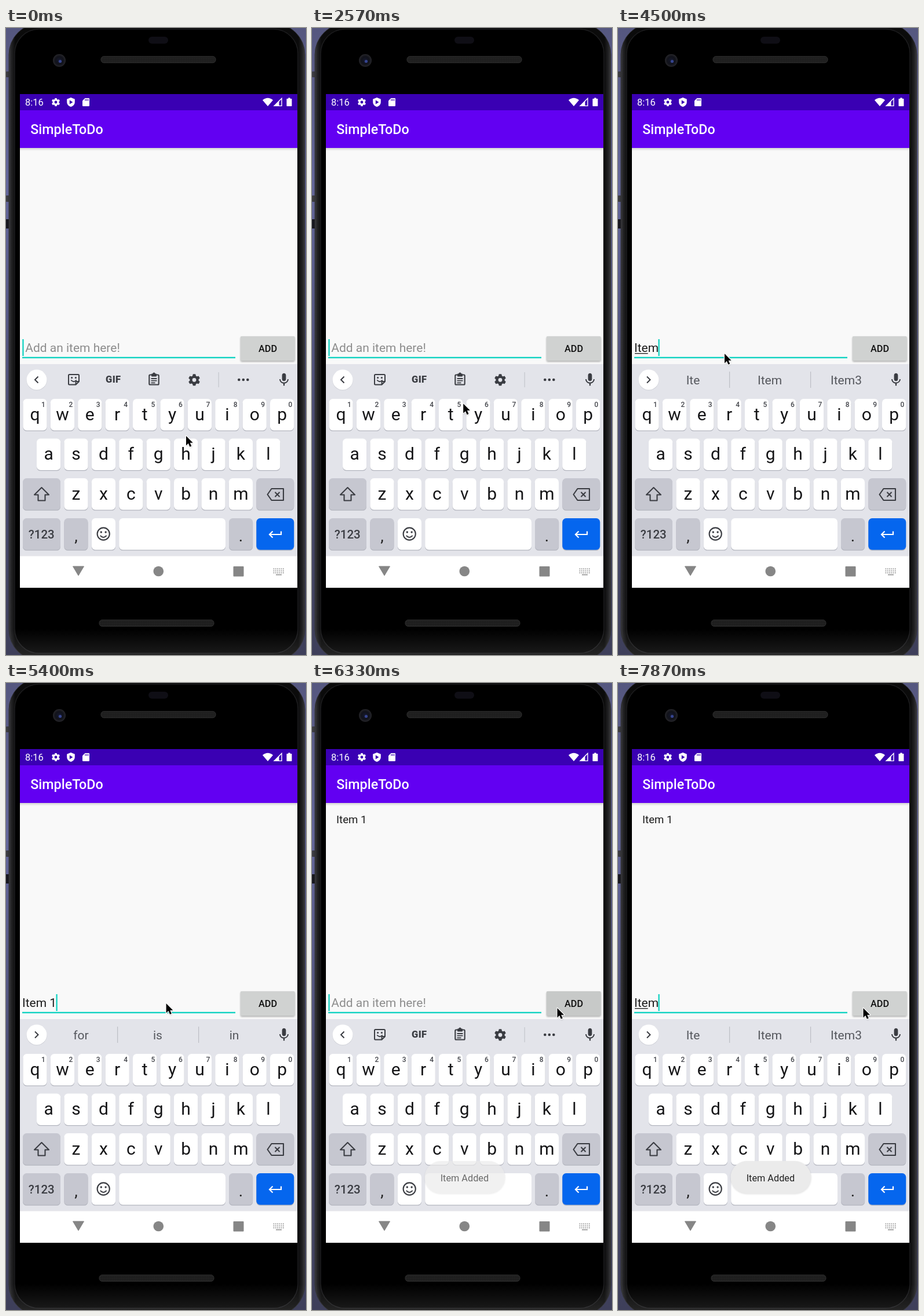
These frames come from a looping animation (518x1082 px, 8 s). An HTML page:

```html
<!DOCTYPE html>
<html lang="en">
<head>
<meta charset="utf-8">
<title>To-do list</title>
<style>
html, body { margin: 0; width: 100%; height: 100%; overflow: hidden; background: #23233a; }
svg { display: block; width: 518px; height: 1082px; }
text { font-family: Roboto, "Noto Sans", sans-serif; white-space: pre; }
</style>
</head>
<body>
<svg id="stage" viewBox="0 0 518 1082">
  <defs>
    <linearGradient id="wall" x2="0" y2="1">
      <stop offset="0" stop-color="#55577f"/><stop offset=".25" stop-color="#63669a"/>
      <stop offset=".6" stop-color="#4c4e74"/><stop offset="1" stop-color="#3e3f5a"/>
    </linearGradient>
    <linearGradient id="rim">
      <stop offset="0" stop-color="#3c3c3f"/><stop offset=".008" stop-color="#232325"/>
      <stop offset=".022" stop-color="#0b0b0b"/><stop offset=".978" stop-color="#0b0b0b"/>
      <stop offset=".992" stop-color="#232325"/><stop offset="1" stop-color="#3c3c3f"/>
    </linearGradient>
    <linearGradient id="sheen" x2="0" y2="1">
      <stop offset=".95" stop-color="#fff" stop-opacity="0"/><stop offset="1" stop-color="#fff" stop-opacity=".13"/>
    </linearGradient>
    <linearGradient id="drop" x2="0" y2="1">
      <stop offset="0" stop-color="#000" stop-opacity=".16"/><stop offset="1" stop-color="#000" stop-opacity="0"/>
    </linearGradient>
    <radialGradient id="lens">
      <stop offset="0" stop-color="#161a30"/><stop offset=".6" stop-color="#11121a"/>
      <stop offset="1" stop-color="#26262a"/>
    </radialGradient>
    <pattern id="mesh" width="3" height="3" patternUnits="userSpaceOnUse">
      <rect width="3" height="3" fill="#1c1c1c"/><circle cx="1.5" cy="1.5" r=".8" fill="#2c2c2c"/>
    </pattern>
    <filter id="soft" x="-20%" y="-20%" width="140%" height="150%"><feGaussianBlur stdDeviation="1.5"/></filter>
  </defs>
</svg>
<script>
const LOOP = 8000;
const stage = document.getElementById('stage');
const DARK = '#3a3c42', TEAL = '#12d3c2', KEY = '#fff', MOD = '#c6c7d0';

function add(tag, attrs, parent = stage) {
  const el = document.createElementNS('http://www.w3.org/2000/svg', tag);
  for (const k in attrs) el.setAttribute(k, attrs[k]);
  parent.appendChild(el);
  return el;
}
const group = (parent, attrs = {}) => add('g', attrs, parent);
const rect = (x, y, width, height, fill, rx = 0, parent, more) =>
  add('rect', { x, y, width, height, fill, rx, ...more }, parent);
const disc = (cx, cy, r, fill, parent, more) => add('circle', { cx, cy, r, fill, ...more }, parent);
const shape = (d, fill, parent, more) => add('path', { d, fill, ...more }, parent);
const stroke = (d, color, width, parent, more) =>
  shape(d, 'none', parent, { stroke: color, 'stroke-width': width, ...more });
function label(str, x, y, size, fill, parent, more) {
  const el = add('text', { x, y, 'font-size': size, fill, ...more }, parent);
  el.textContent = str;
  return el;
}
const MID = { 'text-anchor': 'middle' };
const BOLD = { 'font-weight': 500 };
const show = (el, on) => el.setAttribute('visibility', on ? 'inherit' : 'hidden');
// 24-unit icon box centred on x, y
const icon = (x, y, size, parent) =>
  group(parent, { transform: `translate(${x - size / 2} ${y - size / 2}) scale(${size / 24})` });

function gear(x, y, size, color, parent) {
  const g = icon(x, y, size, parent);
  disc(12, 12, 5.5, 'none', g, { stroke: color, 'stroke-width': 4.2 });
  for (let i = 0; i < 6; i++)
    shape('M9 5.5L9.8 2h4.4L15 5.5z', color, g, { transform: `rotate(${i * 60} 12 12)` });
}

function drawPhone() {
  rect(0, 0, 518, 1082, 'url(#wall)');
  rect(0, 75, 10, 10, '#3b3b40', 1);
  rect(0, 289, 10, 11, '#3b3b40', 1);
  rect(0, 330, 5, 16, '#17171f');
  rect(5, -8, 511, 1100, 'url(#rim)', 54, stage, { stroke: '#2e2e31', 'stroke-width': 1 });
  rect(15, 2, 489, 1077, '#000', 42, stage, { stroke: '#1d1d1f', 'stroke-width': 1.5 });
  rect(5, -8, 511, 1100, 'url(#sheen)', 54);
  rect(246, 15, 34, 12, '#0f0e15', 6);
  disc(92, 56, 11, 'url(#lens)');
  disc(93.5, 57.5, 2.6, '#36458f');
  for (const [x, y] of [[164, 49], [161, 1021.5]])
    rect(x, y, 198, 11, 'url(#mesh)', 5, stage, { stroke: '#303030', 'stroke-width': 1 });
}

function drawBars() {
  rect(24, 114, 479, 852, '#f9f9f9');
  rect(24, 207, 479, 5, 'url(#drop)');
  rect(24, 114, 479, 28, '#3a00b3');
  rect(24, 142, 479, 65, '#6200f2');
  label('8:16', 33, 134, 16.5, '#fff');
  gear(86, 128, 17, '#fff');
  shape('M112 120l6.8 2.8v5c0 4-2.8 7-6.8 8.2c-4-1.2-6.8-4.2-6.8-8.2v-5z', '#fff');
  shape('M109.8 124.5v7l5.6-3.5z', '#3a00b3');
  shape('M136.5 121h6.2q1.3 0 1.3 1.3v11.4q0 1.3-1.3 1.3h-9.4q-1.3 0-1.3-1.3v-8.2z', '#fff');
  for (const x of [136.4, 138.8, 141.2]) rect(x, 122.6, 1.2, 3, '#3a00b3');
  shape('M443 124.5q9-7.5 18 0L452 135z', '#fff');
  stroke('M463 134.4L476 121.4V134.4z', '#fff', 1.4);
  shape('M462.5 135L471.5 126v9z', '#fff');
  shape('M487.3 120.5h3.4v1.5h2q.8 0 .8.8v11.4q0 .8-.8.8h-7.4q-.8 0-.8-.8v-11.4q0-.8.8-.8h2z', '#fff');
  label('SimpleToDo', 42.3, 183, 23.3, '#fff', stage, BOLD);
}

function drawNav() {
  rect(24, 911, 479, 55, '#fff');
  rect(24, 910.5, 479, 1, '#e8e8ea');
  shape('M115.5 929h19L125 945z', '#868686', stage, { stroke: '#868686', 'stroke-linejoin': 'round' });
  disc(263.3, 937.5, 8.8, '#868686');
  rect(392.5, 929, 18, 17.5, '#868686', 1);
  for (let r = 0; r < 3; r++)
    for (let c = 0; c < 6; c++) rect(461.5 + c * 3.3, 932.5 + r * 3.4, 1.8, 1.8, '#9a9a9a');
  rect(466, 942.6, 10, 1.8, '#9a9a9a');
}

function key(x, y, w, fill) {
  rect(x, y + 1.3, w, 54.5, '#b4b6bf', 6.5);
  rect(x, y, w, 54.5, fill, 6.5);
}

const letters = [];
function drawKeys() {
  rect(24, 580, 479, 331, '#e3e4ea');
  const rows = [['qwertyuiop', 50, 640], ['asdfghjkl', 73.6, 708.5], ['zxcvbnm', 121, 777]];
  for (const [chars, x0, y] of rows)
    [...chars].forEach((ch, i) => {
      const x = x0 + i * 47.4;
      key(x - 20.6, y, 41.2, KEY);
      letters.push({ ch, el: label(ch, x, y + 36.8, 30, '#151517', stage, MID) });
      if (y === 640) label((i + 1) % 10, x + 14.4, 653.5, 12, '#44464c', stage, { ...MID, ...BOLD });
    });

  key(29, 777, 65, MOD);
  key(432.3, 777, 65, MOD);
  stroke('M451.5 805l7-10h20.5v20H458.5zM464.5 801l8 8m0-8l-8 8', DARK, 2.1, stage, { 'stroke-linejoin': 'round' });

  key(29, 846, 65, MOD);
  key(100.3, 846, 41.2, MOD);
  key(147.8, 846, 41.2, KEY);
  key(195.2, 846, 183.8, KEY);
  key(385, 846, 41.2, MOD);
  key(432.3, 846, 65, '#0566ee');
  label('?123', 61.3, 880.5, 20.5, DARK, stage, { ...MID, ...BOLD });
  label(',', 121, 886, 28, '#222', stage, MID);
  label('.', 405.5, 886, 28, '#222', stage, MID);
  disc(168.2, 873, 10.6, 'none', stage, { stroke: DARK, 'stroke-width': 2.1 });
  disc(164.3, 870, 1.7, DARK);
  disc(172.1, 870, 1.7, DARK);
  stroke('M162.8 875.8q5.4 6.2 10.8 0', DARK, 2);
  stroke('M475 868.5v5.5h-20m5.5-5.5l-5.5 5.5l5.5 5.5', '#fff', 2.2);
}

function drawMic() {
  const g = icon(480, 607, 27);
  shape('M12 14c1.66 0 3-1.34 3-3V5c0-1.66-1.34-3-3-3S9 3.34 9 5v6c0 1.66 1.34 3 3 3zM17.3 11c0 3-2.54 5.1-5.3 5.1S6.7 14 6.7 11H5c0 3.41 2.72 6.23 6 6.72V21h2v-3.28c3.28-.48 6-3.3 6-6.72z', DARK, g);
}

function drawTools() {
  const g = group();
  stroke('M55.5 601.5l-5.5 5.5l5.5 5.5', DARK, 2, g);
  stroke('M109.5 598h15q1.5 0 1.5 1.5v10.5l-5.5 5.5h-11q-1.5 0-1.5-1.5v-14.5q0-1.5 1.5-1.5zM126 610h-5.5v5.5', DARK, 2, g);
  stroke('M112.3 607.5q4.7 5.5 9.4 0', DARK, 1.9, g);
  disc(113.6, 603.5, 1.5, DARK, g);
  disc(120.4, 603.5, 1.5, DARK, g);
  label('GIF', 185.3, 612.3, 16.5, DARK, g, { ...MID, 'font-weight': 900, 'letter-spacing': .4 });
  rect(247.3, 598.5, 16.4, 17, 'none', 1.5, g, { stroke: DARK, 'stroke-width': 2.1 });
  rect(251, 596.5, 9, 5, DARK, 1, g);
  disc(255.5, 596.7, 2.2, DARK, g);
  stroke('M250.5 605h10m-10 3.7h10m-10 3.7h7', DARK, 1.8, g);
  gear(325, 607.3, 24, DARK, g);
  rect(366.5, 594, 1.2, 26, '#c3c5cc', 0, g);
  for (const x of [402.3, 409.8, 417.3]) disc(x, 607, 2.3, DARK, g);
  return g;
}

function drawHints() {
  const g = group();
  stroke('M50 601.5l5.5 5.5l-5.5 5.5', DARK, 2, g);
  for (const x of [192, 332]) rect(x, 593, 1.2, 28, '#bcbec5', 0, g);
  const words = [129.5, 262, 394].map(x => label('', x, 614.5, 21, '#55575d', g, MID));
  return { g, words };
}

drawPhone();
drawBars();
const listed = label('Item 1', 42, 242, 18.6, '#1c1c1c');
const prompt = label('Add an item here!', 33.3, 559, 20.97, '#8d8d8d');
const field = label('', 28, 559, 20.97, '#1c1c1c');
const under = rect(29, 561, 0, 1.3, '#1c1c1c');
rect(28, 567.6, 368, 2.4, TEAL);
const caret = rect(28.3, 537, 2.3, 29, TEAL);

const shade = rect(405, 533.5, 93.5, 42.5, '#000', 2, stage, { filter: 'url(#soft)' });
rect(404.8, 532, 94, 42.3, '#d0d2d1', 2);
const press = rect(404.8, 532, 94, 42.3, '#000', 2);
label('ADD', 452, 559, 16.3, '#111', stage, { ...MID, ...BOLD });

drawKeys();
const shift = shape('M61.5 793l12.5 12.5h-6.5v10h-12v-10H49z', 'none', stage,
  { stroke: DARK, 'stroke-width': 2.1, 'stroke-linejoin': 'round' });
disc(53, 607.8, 17.6, '#c9cbd2');
disc(53, 607, 17.5, '#fff');
const tools = drawTools();
const hints = drawHints();
drawMic();
drawNav();

const toast = group();
rect(194.5, 826, 139, 56, '#000', 28, toast, { opacity: .12, filter: 'url(#soft)' });
rect(194.5, 825, 138.7, 56, '#ebebeb', 28, toast);
label('Item Added', 263.4, 860, 16.3, '#222', toast, MID);

const pointer = group();
const arrow = 'M0 0V16.4L3.8 12.8L6.4 18.8L9.3 17.6L6.7 11.7H11.7z';
shape(arrow, '#000', pointer, { opacity: .3, transform: 'translate(.5 1.5)', filter: 'url(#soft)' });
shape(arrow, '#000', pointer, { stroke: '#fff', 'stroke-width': 2.4, 'paint-order': 'stroke', 'stroke-linejoin': 'round' });

// time, text, underlined letters, suggestions
const TYPING = [
  [-430, '', 0, ''],
  [4030, 'I', 1, "I,I'm,In"],
  [4200, 'It', 2, "It's,It,In"],
  [4400, 'Ite', 3, 'Ite,Item,Item3'],
  [4500, 'Item', 3, 'Ite,Item,Item3'],
  [4700, 'Item', 4, "Items,Item,Item's"],
  [5000, 'Item ', 0, 'for,is,in'],
  [5230, 'Item 1', 0, 'for,is,in'],
  [6070, '', 0, ''],
  [7270, 'I', 1, "I,I'm,In"],
  [7570, 'It', 2, "It's,It,In"],
  [7800, 'Ite', 3, 'Ite,Item,Item3'],
  [7870, 'Item', 3, 'Ite,Item,Item3']
];
const CAPS = [[3730, 4030], [7070, 7270]];
const PATH_X = [[2400, 311], [2800, 184], [5130, 184], [5400, 276], [5800, 423.5]];
const PATH_Y = [[2400, 704], [2800, 562], [5130, 562], [5400, 553], [5800, 561]];
const TOAST = [[6200, 0], [6330, .67], [6500, 1]];
const PRESS = [[5870, 0], [5970, .12], [6100, .12], [6330, .045], [6600, 0]];
const LIFT = [[5870, .3], [5970, .5], [6100, .5], [6200, .3]];

const smooth = p => p * p * (3 - 2 * p);
const linear = p => p;
function at(steps, t, ease = linear) {
  if (t <= steps[0][0]) return steps[0][1];
  for (let i = 1; i < steps.length; i++) {
    const [t0, a] = steps[i - 1], [t1, b] = steps[i];
    if (t < t1) return a + (b - a) * ease((t - t0) / (t1 - t0));
  }
  return steps[steps.length - 1][1];
}
// soft start, straight middle, soft stop
function glide(steps, t) {
  if (t < 5130) return at(steps, t, smooth);
  return at(steps, t, t < 5400 ? p => p ** 1.6 : p => 1 - (1 - p) ** 1.6);
}

let caps = null;
function setCaps(on) {
  if (on === caps) return;
  caps = on;
  for (const { ch, el } of letters) el.textContent = on ? ch.toUpperCase() : ch;
  shift.setAttribute('fill', on ? DARK : 'none');
}

function render(t) {
  const [since, text, marked, words] = TYPING.filter(s => s[0] <= t).pop();
  field.textContent = text;
  show(prompt, !text);
  under.setAttribute('width', marked ? field.getSubStringLength(0, marked) - 1 : 0);
  caret.setAttribute('x', text ? 27.4 + field.getComputedTextLength() : 28.3);
  show(caret, (t - since) % 1000 < 500);

  show(tools, !words);
  show(hints.g, !!words);
  words.split(',').forEach((w, i) => { hints.words[i].textContent = w; });
  setCaps(CAPS.some(([a, b]) => t >= a && t < b));

  show(listed, t >= 6070);
  press.setAttribute('opacity', at(PRESS, t));
  shade.setAttribute('opacity', at(LIFT, t));
  toast.setAttribute('opacity', at(TOAST, t));
  pointer.setAttribute('transform', `translate(${glide(PATH_X, t)} ${glide(PATH_Y, t)})`);
}

const start = performance.now();
function tick() {
  render((performance.now() - start) % LOOP);
  requestAnimationFrame(tick);
}
render(0);
requestAnimationFrame(tick);
</script>
</body>
</html>
```
